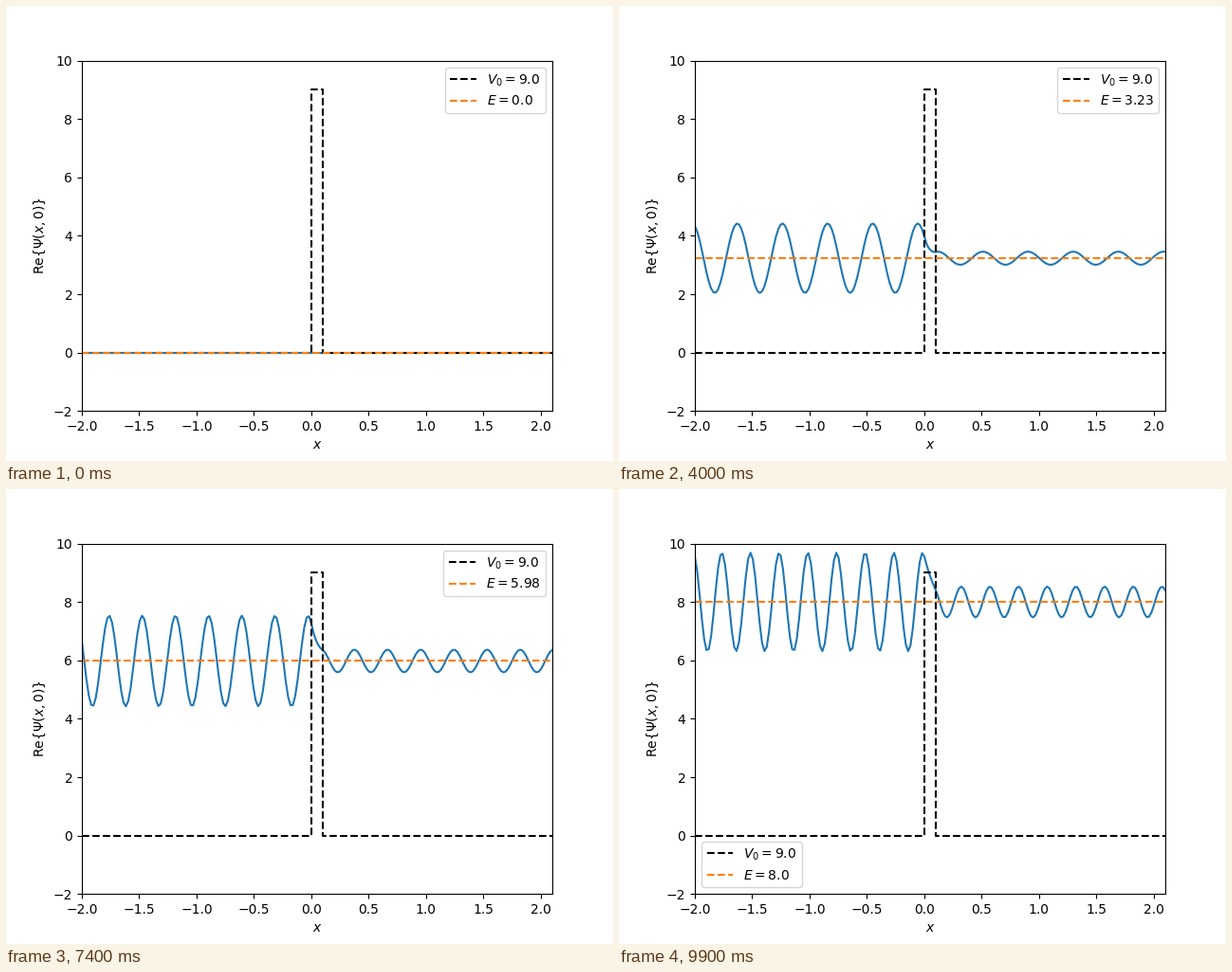
A matplotlib script that plays this animation: 640x480 px, repeating every 10000 ms.

```python
import numpy as np
import matplotlib.pyplot as plt
from matplotlib.animation import FuncAnimation

V0 = 9.0      # barrier height
A = 0.1       # barrier width
HBAR = 1 / (2 * np.pi)
MASS = 1.0
FRAMES = 100

energies = np.linspace(0, 8, FRAMES)
x_left = np.linspace(-20 * A, 0, 100)
x_in = np.linspace(0, A, 100)
x_right = np.linspace(A, 21 * A, 100)
x_all = np.concatenate([x_left, x_in, x_right])


def wave(e):
    """Real part of the stationary state for a unit wave from the left."""
    k = np.sqrt(2 * MASS * e) / HBAR
    q = np.sqrt(2 * MASS * (V0 - e)) / HBAR
    sh, ch = np.sinh(q * A), np.cosh(q * A)
    den = 2 * k * q * ch + 1j * (q**2 - k**2) * sh
    refl = -1j * (q**2 + k**2) * sh / den
    edge = 2 * k * q / den  # value at x = A

    left = np.exp(1j * k * x_left) + refl * np.exp(-1j * k * x_left)
    d = q * (x_in - A)
    inside = edge * (np.cosh(d) + 1j * k / q * np.sinh(d))
    right = edge * np.exp(1j * k * (x_right - A))
    return np.concatenate([left, inside, right]).real


fig, ax = plt.subplots(figsize=(6.4, 4.8), dpi=100)
ax.set_xlim(-20 * A, 21 * A)
ax.set_ylim(-2, 10)
ax.set_xlabel(r"$x$")
ax.set_ylabel(r"Re$\{\Psi(x,0)\}$")

psi_line, = ax.plot(x_all, np.zeros_like(x_all), color="C0")
ax.plot([-20 * A, 0, 0, A, A, 21 * A], [0, 0, V0, V0, 0, 0],
        "--", color="black", label=f"$V_0 = {V0}$")
e_line, = ax.plot([-20 * A, 21 * A], [0, 0], "--", color="C1")


def update(i):
    e = energies[i]
    psi_line.set_ydata(e + wave(e))
    e_line.set_ydata([e, e])
    e_line.set_label(f"$E = {round(float(e), 2)}$")
    ax.legend(loc="best")
    return psi_line, e_line


anim = FuncAnimation(fig, update, frames=FRAMES, interval=100,
                     repeat=True, repeat_delay=0, blit=False)
plt.show()
```
